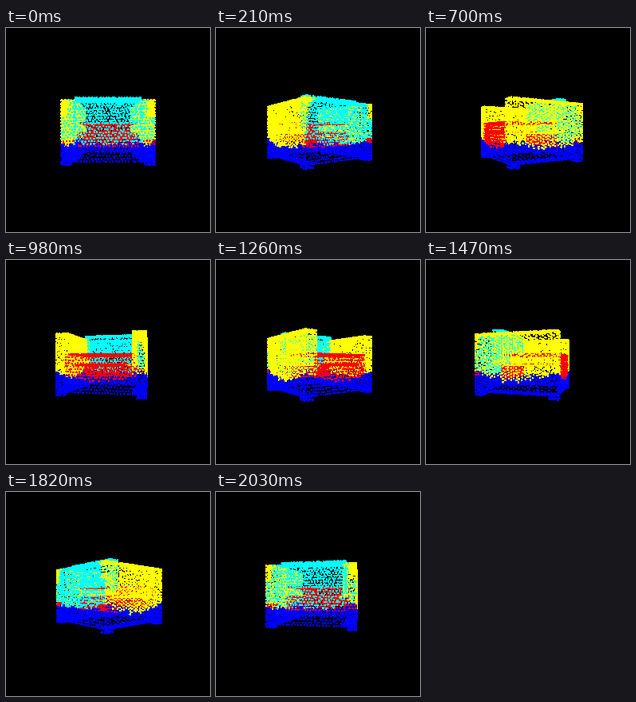
These frames come from a looping animation (256 px wide and 256 px high, 2.1 s). A matplotlib script:

```python
import numpy as np
import matplotlib.pyplot as plt
from matplotlib.animation import FuncAnimation

SIZE, DPI = 256, 100
FRAMES, STEP_MS = 30, 70
FOCAL, DIST = 236, 5.0
SPACING = 0.069
DOT = 1.6  # px, before rounding out to whole pixels

YELLOW, CYAN, RED, BLUE = (1, 1, 0), (0, 1, 1), (1, 0, 0), (0, 0, 1)

W, D = 1.0, 0.955          # outer half width and half depth
INNER = 0.73               # inner side of the arms
TOP, FLOOR, FOOT = 0.64, -0.68, -0.755
SEAT, GAP = 0.17, -0.07    # cushion top and bottom
BACK_W, BACK_TOP, BACK_NEAR, BACK_FAR = 0.76, 0.75, 0.40, 0.62

rng = np.random.default_rng(4)
cloud, paint = [], []


def panel(axis, at, a, b, color):
    """Scatter points evenly on a rectangle lying across the given axis."""
    nu = max(2, round((a[1] - a[0]) / SPACING) + 1)
    nv = max(2, round((b[1] - b[0]) / SPACING / 0.93) + 1)
    u, v = np.meshgrid(np.linspace(*a, nu), np.linspace(*b, nv))
    u[1::2] += 0.5 * SPACING
    u = np.clip(u + rng.normal(0, 0.13 * SPACING, u.shape), *a).ravel()
    v = np.clip(v + rng.normal(0, 0.13 * SPACING, v.shape), *b).ravel()
    pts = np.insert(np.column_stack([u, v]), axis, at, axis=1)
    cols = color(*pts.T) if callable(color) else np.tile(color, (len(pts), 1))
    cloud.append(pts)
    paint.append(cols)


def fade_to_blue(color, y, level):
    limit = level + rng.normal(0, 0.025, y.shape)
    return np.where((y < limit)[:, None], BLUE, color)


def arm_side(x, y, z):
    return fade_to_blue(YELLOW, y, -0.42 + 0.2 * z**2)


def arm_rear(x, y, z):
    outer = (y > 0.28) & (abs(x) > 0.86)
    color = np.where(outer[:, None], YELLOW, CYAN)
    color = np.where((y < -0.2)[:, None], RED, color)
    return fade_to_blue(color, y, -0.31)


def rear_wall(x, y, z):
    return fade_to_blue(CYAN, y, -0.33 + 0.08 * x**2)


def seat_front(x, y, z):
    return fade_to_blue(RED, y, -0.42 + 0.15 * x**2)


def seat_base(x, y, z):
    return np.where((abs(x) > 0.6)[:, None], YELLOW, RED)


def build():
    height, depth, inside = (FLOOR, TOP), (-D, D), (-INNER, INNER)

    for s in (-1, 1):
        arm = tuple(sorted((s * INNER, s * W)))
        panel(0, s * W, height, depth, arm_side)
        panel(0, s * INNER, (GAP, TOP), (-D, BACK_FAR), YELLOW)
        panel(1, TOP, arm, depth, YELLOW)
        panel(1, FLOOR, arm, depth, BLUE)
        panel(2, -D, arm, height, arm_side)
        panel(2, D, arm, height, arm_rear)
        for z in (-D, D - 0.18):
            foot = tuple(sorted((s * (W - 0.18), s * W)))
            panel(1, FOOT, foot, (z, z + 0.18), BLUE)
            panel(0, s * W, (FOOT, FLOOR), (z, z + 0.18), BLUE)
            panel(2, z, foot, (FOOT, FLOOR), BLUE)

    # rear wall and its ledge
    panel(2, D, inside, height, rear_wall)
    panel(1, TOP, inside, (BACK_FAR, D), CYAN)

    # back cushion
    back = (-BACK_W, BACK_W)
    panel(2, BACK_NEAR, back, (SEAT, BACK_TOP), CYAN)
    panel(1, BACK_TOP, back, (BACK_NEAR, BACK_FAR), CYAN)
    for s in (-1, 1):
        panel(0, s * BACK_W, (0.05, BACK_TOP), (BACK_NEAR, BACK_FAR), CYAN)

    # seat
    panel(1, SEAT, inside, (-0.95, BACK_NEAR), RED)
    panel(1, GAP, inside, (-0.95, BACK_NEAR), seat_base)
    panel(2, -0.95, (-0.76, 0.76), (FLOOR, SEAT), seat_front)
    panel(2, BACK_NEAR, inside, (-0.4, GAP), RED)


build()
points, colors = np.vstack(cloud), np.vstack(paint)

fig = plt.figure(figsize=(SIZE / DPI, SIZE / DPI), dpi=DPI, facecolor="black")
ax = fig.add_axes([0, 0, 1, 1])
ax.set(xlim=(0, SIZE), ylim=(SIZE, 0))
ax.axis("off")
dots = ax.scatter(points[:, 0], points[:, 1], s=(DOT * 72 / DPI) ** 2,
                  c=colors, linewidths=0, antialiased=False)


def update(i):
    t = 2 * np.pi * i / FRAMES
    x, y, z = points.T
    across = x * np.cos(t) + z * np.sin(t)
    near = z * np.cos(t) - x * np.sin(t)
    scale = FOCAL / (DIST - near)
    order = np.argsort(near)
    screen = np.column_stack([128 + across * scale, 128 - y * scale])
    dots.set_offsets(screen[order])
    dots.set_facecolors(colors[order])
    return (dots,)


anim = FuncAnimation(fig, update, frames=FRAMES, interval=STEP_MS,
                     repeat=True, repeat_delay=0)
plt.show()
```
